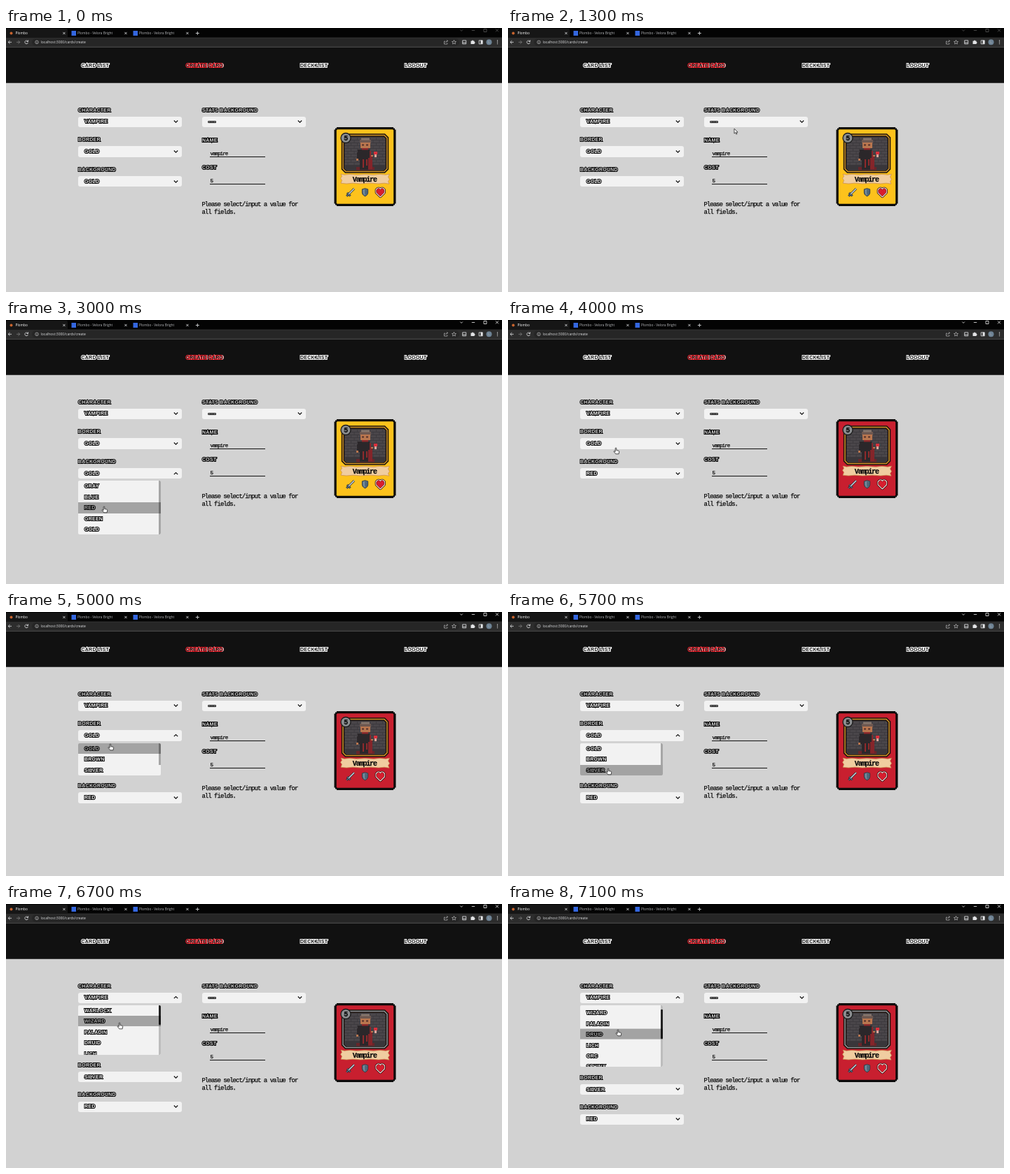
An HTML page for the animation above (7.2 s loop, 708x378 px).

```html
<!DOCTYPE html>
<html lang="en">
<head>
<meta charset="utf-8">
<title>Card editor</title>
<style>
html, body { margin: 0; width: 100%; height: 100%; overflow: hidden; background: #d2d2d2; }
#stage { position: relative; width: 708px; height: 378px; overflow: hidden; }
#stage > svg { position: absolute; left: 0; top: 0; }

/* hollow lettering: the ink is the outline, the inside shows the ground */
.pixel {
  --ink: #000; --ground: #d2d2d2;
  font: bold 7px/8px "Liberation Sans", Arial, sans-serif; letter-spacing: .25px; white-space: nowrap;
  color: var(--ground); -webkit-text-stroke: 1.9px var(--ink); paint-order: stroke fill;
  text-shadow: .4px .8px 0 var(--ink);
}
svg .pixel { fill: var(--ground); stroke: var(--ink); stroke-width: 1.9px; }
.nav { --ink: #fff; --ground: #111; }
.select, .menu { --ground: #f2f2f2; color: var(--ground); background: var(--ground); }
.mono {
  font: 9px "Liberation Mono", monospace; letter-spacing: -.98px;
  fill: #0c0c0c; stroke: #0c0c0c; stroke-width: .25px;
}
.input { font-size: 7.6px; letter-spacing: -1.03px; }
.title { font-weight: bold; font-size: 10px; letter-spacing: -1.14px; }
.ui { font: 4.8px "Open Sans", "Noto Sans", sans-serif; fill: #b4b6b9; }

/* form */
.column { position: absolute; top: 113.5px; width: 148px; }
.field { padding-bottom: 11.1px; }
.select { position: relative; height: 15.3px; margin: 5.3px 0 3px; width: 147.5px; border-radius: 3px; }
.select span { position: absolute; left: 9px; top: 3.7px; }
.select svg { position: absolute; left: 136px; top: 4.5px; }
.menu { position: relative; width: 118px; max-height: 0; overflow: hidden; border-radius: 2px; }
.option { height: 15.4px; line-height: 15.4px; padding-left: 9px; }
.list { position: relative; }
.hover { position: absolute; left: 0; top: 0; width: 118px; height: 15.4px; background: rgba(0,0,0,.33); opacity: 0; }
.track { position: absolute; right: 0; top: 0; width: 3px; height: 100%; background: #a6a6a6; }
.thumb { position: absolute; right: 0; top: 0; width: 3px; background: #222; border-radius: 1px; }

/* timeline */
.run, .run * { animation-duration: 7.2s; animation-iteration-count: infinite; animation-timing-function: linear; }
.run .step { animation-timing-function: step-end; }

#bg .menu { animation-name: bgMenu; }
#bg .hover { animation-name: bgHover; }
#bg .down { animation-name: bgClosed; }
#bg .up { animation-name: bgOpen; }
#bg .old { animation-name: bgOld; }
#bg .new { animation-name: bgNew; }
@keyframes bgMenu { 0%, 27.7% { max-height: 0 } 33.2%, 48.6% { max-height: 88.4px } 54.1%, 100% { max-height: 0 } }
@keyframes bgHover {
  0% { opacity: 0 } 36.1% { opacity: 1; top: 0 } 38.8% { opacity: 1; top: 15.4px }
  41.6% { opacity: 1; top: 30.8px } 54.1%, 100% { opacity: 0 }
}
@keyframes bgOpen { 0% { opacity: 0 } 27.7% { opacity: 1 } 48.6%, 100% { opacity: 0 } }
@keyframes bgClosed { 0% { opacity: 1 } 27.7% { opacity: 0 } 48.6%, 100% { opacity: 1 } }
@keyframes bgOld { 0% { opacity: 1 } 48.6%, 100% { opacity: 0 } }
@keyframes bgNew { 0% { opacity: 0 } 48.6%, 100% { opacity: 1 } }

#border .menu { animation-name: borderMenu; }
#border .hover { animation-name: borderHover; }
#border .track { height: 31px; }
#border .down { animation-name: borderClosed; }
#border .up { animation-name: borderOpen; }
#border .old { animation-name: borderOld; }
#border .new { animation-name: borderNew; }
@keyframes borderMenu { 0%, 63.2% { max-height: 0 } 68.7%, 81.3% { max-height: 88.4px } 86.8%, 100% { max-height: 0 } }
@keyframes borderHover {
  0% { opacity: 0 } 69.4% { opacity: 1; top: 0 } 74.9% { opacity: 1; top: 15.4px }
  77.7% { opacity: 1; top: 30.8px } 86.8%, 100% { opacity: 0 }
}
@keyframes borderOpen { 0% { opacity: 0 } 63.2% { opacity: 1 } 81.9%, 100% { opacity: 0 } }
@keyframes borderClosed { 0% { opacity: 1 } 63.2% { opacity: 0 } 81.9%, 100% { opacity: 1 } }
@keyframes borderOld { 0% { opacity: 1 } 81.9%, 100% { opacity: 0 } }
@keyframes borderNew { 0% { opacity: 0 } 81.9%, 100% { opacity: 1 } }

#character .menu { animation-name: charMenu; }
#character .list { animation-name: charScroll; }
#character .hover { animation-name: charHover; }
#character .thumb { animation-name: charThumb; }
#character .track { background: #bdbdbd; }
#character .down { animation-name: charClosed; }
#character .up { animation-name: charOpen; }
@keyframes charMenu { 0%, 88.6% { max-height: 0 } 94.2%, 100% { max-height: 88.4px } }
@keyframes charScroll { 0%, 95.1% { transform: none } 97.9%, 100% { transform: translateY(-12.4px) } }
@keyframes charHover {
  0% { opacity: 0 } 90.2% { opacity: 1; top: 0 } 91.6% { opacity: 1; top: 15.4px }
  95.8% { opacity: 1; top: 30.8px } 97.2%, 100% { opacity: 1; top: 46.2px }
}
@keyframes charThumb {
  0%, 88.6% { height: 0; top: 0 } 93% { height: 27px; top: 0 } 94.2%, 95.1% { height: 42px; top: 0 }
  97.9%, 100% { height: 42px; top: 6px }
}
@keyframes charOpen { 0% { opacity: 0 } 88.6%, 100% { opacity: 1 } }
@keyframes charClosed { 0% { opacity: 1 } 88.6%, 100% { opacity: 0 } }

.face { animation-name: face; }
.frame { animation-name: frame; }
.windowKeys { animation-name: focus; }
@keyframes face { 0% { fill: #fdc21c } 48.6%, 100% { fill: #c81f2f } }
@keyframes frame { 0% { stroke: #d0942a } 81.9%, 100% { stroke: #8f959b } }
@keyframes focus { 0% { opacity: .35 } 27.7%, 100% { opacity: 1 } }

#pointer { animation-name: path; }
#arrow { animation-name: arrow; }
#hand { animation-name: hand; }
@keyframes arrow { 0% { opacity: 0 } 1.38% { opacity: 1 } 26.3%, 100% { opacity: 0 } }
@keyframes hand { 0% { opacity: 0 } 26.3%, 100% { opacity: 1 } }
@keyframes path {
  0%, 1.39% { transform: translate(410px, 282px) }
  11.11% { transform: translate(352px, 196px) }
  18.06% { transform: translate(323px, 144px) }
  22.22% { transform: translate(268px, 190px) }
  25%, 26.4% { transform: translate(224px, 218px) }
  29.17%, 33.33% { transform: translate(192px, 222px) }
  37.5% { transform: translate(152px, 244px) }
  41.67%, 48.61% { transform: translate(140px, 267px) }
  55.56% { transform: translate(154px, 183px) }
  58.33%, 66% { transform: translate(152px, 179px) }
  73.61% { transform: translate(145px, 201px) }
  79.17%, 81.94% { transform: translate(143px, 224px) }
  86.11% { transform: translate(156px, 146px) }
  88.89% { transform: translate(160px, 138px) }
  93.06% { transform: translate(162px, 170px) }
  98.61%, 100% { transform: translate(157px, 180px) }
}
</style>
</head>
<body>
<div id="stage" class="run">
<svg width="708" height="378" viewBox="0 0 708 378">
  <defs>
    <pattern id="bricks" width="9" height="8" patternUnits="userSpaceOnUse">
      <path fill="#4a464a" d="M0 0h9v8h-9z"/>
      <path stroke="#3a373b" stroke-width=".8" fill="none" d="M0 .5h9M0 4.5h9M2 .5v4M6.5 4.5v4"/>
    </pattern>
    <path id="octagon" d="M485 153.5h55l4 4v44l-4 4h-55l-4-4v-44z"/>
    <path id="heart" d="M534.3 241l-5.500-5.500v-3.700l2.200-2h1.600l1.700 1.600l1.700-1.600h1.600l2.200 2v3.700z"/>
  </defs>

  <!-- browser -->
  <path fill="#040404" d="M0 0h708v14h-708z"/>
  <path fill="#2d2d2d" d="M0 13.500h708v14h-708z"/>
  <path fill="#161616" d="M0 14V3q0-2 2-2h84q2 0 2 2v11z"/>
  <rect x="37" y="15.3" width="610" height="10.2" rx="5.1" fill="#262626"/>
  <circle cx="7.5" cy="7.5" r="2" fill="#c8642e"/>
  <path fill="#3467e0" d="M93.500 4h6.500v7h-6.500zM181.500 4h6.500v7h-6.500z"/>
  <g class="ui">
    <text x="13.5" y="9.2" fill="#fff">Plombo</text>
    <text x="102" y="9.2">Plombo - Velora Bright</text>
    <text x="190" y="9.2">Plombo - Velora Bright</text>
    <text x="49.5" y="22.1" style="font-size:5px;fill:#dcdddf">localhost:3000/cards/create</text>
  </g>
  <g fill="none" stroke="#d3d4d6" stroke-width=".9">
    <path d="M81.3 5.9l3.2 3.2m0-3.2l-3.2 3.2M169.3 5.9l3.2 3.2m0-3.2l-3.2 3.2M257.3 5.9l3.2 3.2m0-3.2l-3.2 3.2M270.8 7.500h5m-2.5-2.500v5"/>
    <path d="M8 20.3h-4.800m2.300-2.300l-2.300 2.300l2.300 2.300"/>
    <path stroke="#777" d="M15 20.3h4.800m-2.300-2.300l2.300 2.300l-2.300 2.300"/>
    <path d="M31.200 19.200a2.300 2.300 0 1 0 .2 1.800M31.600 17.300v2.200h-2.200"/>
    <g stroke-width=".6">
      <circle cx="44" cy="20.3" r="2.3"/>
      <path d="M44 18.800v.6M44 20v1.800"/>
      <path d="M627 19h-1.500v4h4.500v-1.500M627.500 21q.5-2.500 3-2.500m-1.200-1.300l1.400 1.300l-1.400 1.300"/>
      <path d="M639.500 17.300l.9 2l2.100.2l-1.600 1.400l.5 2.100l-1.900-1.100l-1.900 1.100l.5-2.100l-1.600-1.400l2.100-.2z"/>
    </g>
    <path d="M651.700 17.800h5v5h-5zM651.700 21h5M675.200 17.800h5v5h-5z"/>
  </g>
  <path fill="#e2e3e5" d="M663.500 18.500h1.600a1 1 0 0 1 2 0h1.500v1.600a1 1 0 0 1 0 2v1h-5.100zM677.600 17.800h2.600v5h-2.600z"/>
  <circle cx="689.5" cy="20.3" r="4" fill="#6d8294"/>
  <text class="ui" x="688.3" y="22">L</text>
  <g fill="#dcdddf"><circle cx="701.5" cy="18" r=".7"/><circle cx="701.5" cy="20.3" r=".7"/><circle cx="701.5" cy="22.6" r=".7"/></g>
  <path class="windowKeys step" fill="none" stroke="#eee" stroke-width=".8"
    d="M648.300 2.600l1.800 1.800l1.800-1.800M664.800 3.500h4.400M682 1.500h4v4h-4zM699 1.400l4 4m0-4l-4 4"/>

  <!-- page header -->
  <path fill="#111" d="M0 27.500h708v51.200h-708z"/>
  <g class="pixel nav">
    <text x="107.5" y="55.5">CARD LIST</text>
    <text x="257" y="55.5" style="stroke:#f5101c">CREATE CARD</text>
    <text x="420" y="55.5">DECK LIST</text>
    <text x="569" y="55.5">LOGOUT</text>
  </g>
  <g class="pixel">
    <text x="280" y="162.600">NAME</text>
    <text x="280" y="201.600">COST</text>
  </g>
  <g class="mono">
    <text class="input" x="291.500" y="182">vampire</text>
    <text class="input" x="291.500" y="221">5</text>
    <text x="279.400" y="255">Please select/input a value for</text>
    <text x="279.400" y="266">all fields.</text>
  </g>
  <path stroke="#111" d="M291 184.500h79M291 223.500h79"/>

  <!-- card -->
  <path fill="#0b0b0b" d="M472 142h81v1.500h2v2h1.500v106h-1.500v2h-2v1.500h-81v-1.500h-2v-2h-1.500v-106h1.500v-2h2z"/>
  <rect class="face step" x="471.800" y="145.300" width="81.400" height="106.400" rx="1.5"/>
  <g>
    <use href="#octagon" fill="url(#bricks)" stroke="#1c130c" stroke-width="4.500"/>
    <use href="#octagon" class="frame step" fill="none" stroke-width="1.500"/>
    <path fill="#39363a" d="M483 196h59v5l-3 3h-53l-3-3z"/>
    <path fill="#67252a" d="M500 199h26v4.500h-26z"/>
    <path fill="#84252a" d="M517 176h4v6h2v20h-7z"/>
    <path fill="#2b272a" d="M502 174h17v12h-2v17h-12v-14h-4v-11h1z"/>
    <path fill="#6e5850" d="M505 160h16v5h-16z"/>
    <path fill="#85756c" d="M507 157.500h12v3h-12z"/>
    <path fill="#b9764f" d="M506 164h14v8h-14z"/>
    <path fill="#54302a" d="M508 166.500h3v2h-3zM514 166.500h3v2h-3z"/>
    <path fill="#8f2a2c" d="M508 172h9v2.500h-9zM509 188h2v12h-2zM514 188h2v9h-2z"/>
    <path fill="#b9764f" d="M500 187h3v3h-3zM521 182h3v2h-3z"/>
    <path fill="#d8313c" d="M525 177h5v4h-5z"/>
    <path fill="#d9a59c" d="M526 181h3v4h-3z"/>
  </g>
  <circle cx="485" cy="157.500" r="7" fill="#8b8e90" stroke="#1c1c1c" stroke-width="1.300"/>
  <text x="482.200" y="161" class="mono title">5</text>
  <path fill="#f0cda0" stroke="#c68a4c" stroke-width=".7"
    d="M478 209l5 1.200l8-.8l9 .8l12-.6l13 .6l9-.8l8 .8l5.500-1l-2 4l2 3.500l-2 3l1.500 3.500l-7-1l-8 .8l-12-.8l-14 .8l-11-.8l-9 .8l-8-.8l1.500-4l-2-3l2-3z"/>
  <text x="494.800" y="219.800" class="mono title">Vampire</text>
  <g stroke-linejoin="round" fill="none">
    <path stroke="#20252c" stroke-width="3" d="M497 230l-8 8M487 236l4.500 4.500M488.500 238.500l-2.300 2.300"/>
    <path stroke="#c3d0da" stroke-width="1.700" d="M497 230l-8 8"/>
    <path stroke="#5b7388" stroke-width="1.300" d="M487 236l4.500 4.500M488.500 238.500l-2.300 2.300"/>
    <path fill="#6f8798" stroke="#34404a" stroke-width="1.200" d="M508.500 231l4-1.200l4 1.200v5q-.5 3.200-4 4.800q-3.500-1.600-4-4.800z"/>
    <path fill="#4a6275" d="M512.500 231v8.600q2.600-1.500 3-3.800v-4z"/>
    <use href="#heart" stroke="#2a090c" stroke-width="4.200"/>
    <use href="#heart" stroke="#f6ece4" stroke-width="2.600"/>
    <use href="#heart" fill="#d81d2e" stroke="#6a0f18" stroke-width=".7"/>
  </g>
</svg>

<div class="column" id="left" style="left:103px"></div>
<div class="column" id="right" style="left:280px"></div>

<svg width="708" height="378" viewBox="0 0 708 378">
  <g id="pointer">
    <path id="arrow" class="step" fill="#fff" stroke="#222" stroke-width=".8" d="M0 0v7l1.700-1.500l1.200 2.500l1.100-.5l-1.100-2.400h2.200z"/>
    <path id="hand" class="step" fill="#fff" stroke="#222" stroke-width=".8" stroke-linejoin="round"
      d="M-.8 .4q.8-.9 1.600 0v3.200l3 .6q1 .3 .9 1.300l-.6 3.300h-4.300l-2.600-3.300q-.3-1 .8-.8l1.200 .8z"/>
  </g>
</svg>
</div>

<script>
const chevron = (name, d) => `<path class="${name} step" d="${d}" fill="none" stroke="#111" stroke-width="1.200"/>`;

function field(id, label, before, after, options = [], scrolls = false) {
  const rows = options.map(name => `<div class="option">${name}</div>`).join("");
  const values = after
    ? `<span class="old step">${before}</span><span class="new step">${after}</span>`
    : `<span>${before}</span>`;
  const thumb = scrolls ? '<div class="thumb"></div>' : "";
  return `<div class="field pixel" id="${id}">${label}
    <div class="select">${values}<svg width="7" height="6">
      ${chevron("down", "M.8 1.500l2.700 2.700l2.700-2.700")}
      ${options.length ? chevron("up", "M.8 4.200l2.700-2.700l2.700 2.700") : ""}</svg></div>
    <div class="menu"><div class="track"></div>${thumb}
      <div class="list">${rows}<div class="hover step"></div></div></div>
  </div>`;
}

const characters = ["WARLOCK", "WIZARD", "PALADIN", "DRUID", "LICH", "ORC", "SPHINX", "VAMPIRE"];
document.getElementById("left").innerHTML =
  field("character", "CHARACTER", "VAMPIRE", "", characters, true) +
  field("border", "BORDER", "GOLD", "SILVER", ["GOLD", "BROWN", "SILVER"]) +
  field("bg", "BACKGROUND", "GOLD", "RED", ["GRAY", "BLUE", "RED", "GREEN", "GOLD"]);
document.getElementById("right").innerHTML = field("stats", "STATS BACKGROUND", "----", "");
</script>
</body>
</html>
```
